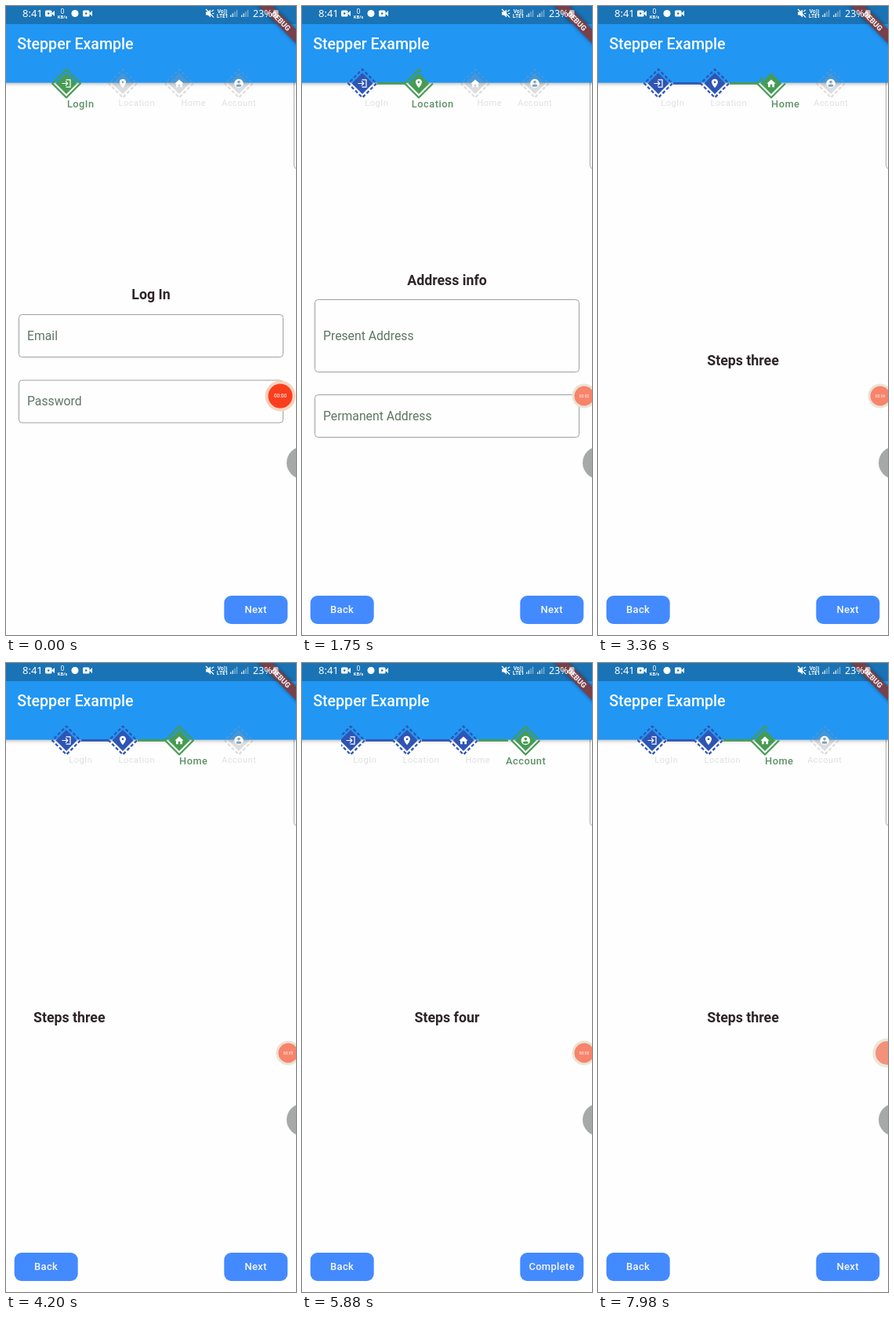
These frames come from a looping animation (370 by 800 pixels, 8 s). An HTML page with a canvas:

```html
<!DOCTYPE html>
<html lang="en">
<head>
<meta charset="utf-8">
<title>Stepper Example</title>
<style>
html, body { margin: 0; width: 100%; height: 100%; overflow: hidden; background: #fff; }
canvas { display: block; width: 370px; height: 800px; }
</style>
</head>
<body>
<canvas id="stage"></canvas>
<script>
const W = 370, H = 800, LOOP = 8000, SLIDE = 800, BORDER = 1600;
const canvas = document.getElementById('stage');
const ratio = window.devicePixelRatio || 1;
canvas.width = W * ratio;
canvas.height = H * ratio;
const c = canvas.getContext('2d');
c.scale(ratio, ratio);

const GREEN = '#469c53', BLUE = '#2e55b4', PENDING = 'rgba(150,152,155,.32)';
const ROBOTO = 'Roboto, sans-serif';

// Page changes: start time and direction
const slides = [[80, 1], [1988, 1], [3916, 1], [6313, -1]];
const steps = [
  { name: 'LogIn', x: 77, label: 95 },
  { name: 'Location', x: 149, label: 166.5 },
  { name: 'Home', x: 221, label: 239 },
  { name: 'Account', x: 297, label: 297 }
];

const clamp = v => Math.max(0, Math.min(1, v));
const ease = v => (1 - Math.cos(Math.PI * clamp(v))) / 2;
const pagePos = t => slides.reduce((p, [s, d]) => p + d * ease((t - s) / SLIDE), 0);

function activeAt(t) {
  let step = 0, since = -1e5;
  for (const [s, d] of slides) {
    if (t >= s + SLIDE / 2) { step += d; since = s + SLIDE / 2; }
  }
  return { step, since };
}

function scrollAt(t) {
  if (t < 6713) return 15 * ease((t - 4316) / 600);
  return 12 - 4 * clamp((t - 6860) / 1100);
}

function text(s, x, y, font, color, align = 'left', spacing = 0) {
  c.font = font;
  c.fillStyle = color;
  c.letterSpacing = spacing + 'px';
  c.textAlign = 'left';
  const w = c.measureText(s).width - spacing;
  c.fillText(s, align === 'center' ? x - w / 2 : x, y);
  c.letterSpacing = '0px';
}

function rect(x, y, w, h, color) {
  c.fillStyle = color;
  c.fillRect(x, y, w, h);
}

function rounded(x, y, w, h, r, fill, stroke) {
  c.beginPath();
  c.roundRect(x, y, w, h, r);
  if (fill) { c.fillStyle = fill; c.fill(); }
  if (stroke) { c.strokeStyle = stroke; c.lineWidth = 1; c.stroke(); }
}

function disc(x, y, r, color) {
  c.beginPath();
  c.arc(x, y, r, 0, Math.PI * 2);
  c.fillStyle = color;
  c.fill();
}

function poly(points, color) {
  c.beginPath();
  points.forEach(([x, y]) => c.lineTo(x, y));
  c.closePath();
  c.fillStyle = color;
  c.fill();
}

function heading(s, y) {
  text(s, 185, y, 'bold 17.75px ' + ROBOTO, '#2e2429', 'center');
}

function field(s, y, h, base) {
  rounded(16.5, y + .5, 337, h, 4, null, '#9da19f');
  text(s, 27, base, '15.75px ' + ROBOTO, '#5f7562');
}

const pages = [
  () => {
    heading('Log In', 373.2);
    field('Email', 392, 54, 424.5);
    field('Password', 475.5, 54, 508);
  },
  () => {
    heading('Address info', 354.5);
    field('Present Address', 373, 92, 424.5);
    field('Permanent Address', 494, 54, 527);
  },
  () => heading('Steps three', 457),
  () => heading('Steps four', 457)
];

function drawPages(t) {
  const pos = pagePos(t);
  pages.forEach((page, i) => {
    const dx = (i - pos) * W;
    if (Math.abs(dx) >= W) return;
    c.save();
    c.translate(dx, 0);
    page();
    c.restore();
  });
}

const icons = [
  () => {
    c.strokeStyle = '#fff';
    c.lineWidth = 1.2;
    c.beginPath();
    c.moveTo(-.5, -4.7); c.lineTo(5, -4.7); c.lineTo(5, 4.7); c.lineTo(-.5, 4.7);
    c.moveTo(-5.5, 0); c.lineTo(1.5, 0);
    c.moveTo(-1, -2.8); c.lineTo(1.8, 0); c.lineTo(-1, 2.8);
    c.stroke();
  },
  color => {
    c.beginPath();
    c.arc(0, -1.7, 4, Math.PI * .9, Math.PI * 2.1);
    c.quadraticCurveTo(3, 2.3, 0, 5.8);
    c.quadraticCurveTo(-3, 2.3, -3.8, -.5);
    c.fillStyle = '#fff';
    c.fill();
    disc(0, -1.7, 1.4, color);
  },
  () => poly([[0, -5], [5.7, .2], [4, .2], [4, 4.8], [1.3, 4.8], [1.3, 1.3],
    [-1.3, 1.3], [-1.3, 4.8], [-4, 4.8], [-4, .2], [-5.7, .2]], '#fff'),
  color => {
    disc(0, 0, 5.7, '#fff');
    disc(0, -1.9, 1.8, color);
    c.beginPath();
    c.ellipse(0, 2.7, 3.4, 1.6, 0, 0, Math.PI * 2);
    c.fill();
  }
];

function diamondPath(r) {
  c.beginPath();
  c.moveTo(r, 0); c.lineTo(0, r); c.lineTo(-r, 0); c.lineTo(0, -r);
  c.closePath();
}

function drawStep(i, x, state, progress) {
  const color = [BLUE, GREEN, PENDING][state];
  c.save();
  c.translate(x, 98.5);
  diamondPath(13.5);
  c.lineJoin = 'round';
  c.fillStyle = color;
  c.fill();
  diamondPath(18);
  c.strokeStyle = color;
  c.lineWidth = 2.2;
  const around = 18 * Math.SQRT2 * 4;
  if (state !== 1) c.setLineDash([around / 24, around / 40]);
  else if (progress < 1) c.setLineDash([around * progress, around]);
  c.stroke();
  c.setLineDash([]);
  icons[i](state === 2 ? '#7fa3c0' : color);
  c.restore();
}

function drawStepper(t) {
  const { step, since } = activeAt(t);
  const lineStep = Math.max(step, activeAt(t - 300).step);
  const progress = clamp((t - since) / BORDER);
  c.save();
  c.beginPath();
  c.rect(50, 70, 270, 70);
  c.clip();
  c.translate(-scrollAt(t), 0);
  for (let i = 0; i < lineStep; i++) {
    const x = steps[i].x + 19;
    rect(x, 97, i === 2 ? 38 : 35, 2.8, i === lineStep - 1 ? GREEN : BLUE);
  }
  steps.forEach((s, i) => {
    const on = i === step;
    const shift = on && i === 3 ? 3.3 : 0;
    drawStep(i, s.x + shift, i < step ? 0 : on ? 1 : 2, progress);
    text(s.name, s.label + shift, on ? 129 : 127.3,
      (on ? '500 12.8px ' : '11px ') + ROBOTO, on ? '#5f8f67' : '#dfe0e1', 'center', .5);
  });
  c.restore();
}

function button(s, x) {
  rounded(x, 750, 81, 36, 9, '#448aff');
  text(s, x + 40.2, 772.3, '500 13px ' + ROBOTO, '#f4f8ff', 'center', .3);
}

function camera(x) {
  rounded(x, 5.5, 8.5, 8, 1.5, '#fff');
  poly([[x + 8, 9.5], [x + 12, 6], [x + 12, 13]], '#fff');
  disc(x + 4.2, 9.5, 1.3, '#1a73b4');
}

function bars(x) {
  for (let i = 0; i < 4; i++) {
    const h = 2.5 + i * 2.2;
    rect(x + i * 2.6, 14 - h, 1.5, h, i < 2 ? '#cfe3f2' : '#76abd3');
  }
}

function drawBanner() {
  c.save();
  c.translate(350.8, 19.2);
  c.rotate(Math.PI / 4);
  c.shadowColor = 'rgba(0,0,0,.45)';
  c.shadowBlur = 5 * ratio;
  rect(-45, -6.2, 90, 12.4, '#77404a');
  c.shadowBlur = 0;
  text('DEBUG', 0, 3.4, '900 9.6px ' + ROBOTO, '#eee6e6', 'center');
  c.restore();
}

function drawStatus() {
  const noto = 'px "Noto Sans", sans-serif';
  text('8:41', 21, 14, '13' + noto, '#fff');
  camera(50);
  text('0', 72, 9.5, '8.5' + noto, '#fff', 'center');
  text('KB/s', 72, 16, 'bold 5.5' + noto, '#fff', 'center');
  disc(88, 9.5, 4.5, '#fff');
  camera(98);
  poly([[255, 7.5], [257.5, 7.5], [261, 4.5], [261, 14.5], [257.5, 11.5], [255, 11.5]], '#fff');
  c.strokeStyle = '#fff';
  c.lineWidth = 1.2;
  c.beginPath();
  c.moveTo(255, 4); c.lineTo(265, 14.5);
  c.moveTo(262, 7); c.lineTo(265, 5); c.moveTo(263, 9.5); c.lineTo(265.5, 9.5);
  c.stroke();
  text('Vo))', 276, 8.5, 'bold 6.5' + noto, '#fff', 'center');
  text('LTE1', 276, 15, 'bold 6.5' + noto, '#fff', 'center');
  bars(286);
  bars(300);
  text('23%', 315, 14, '12.5' + noto, '#fff');
  rounded(341, 5, 6.5, 10, 1.5, 'rgba(255,255,255,.6)');
}

function drawBar() {
  c.save();
  c.shadowColor = 'rgba(0,0,0,.35)';
  c.shadowBlur = 5 * ratio;
  c.shadowOffsetY = 1.5 * ratio;
  rect(-10, 0, W + 20, 97.6, '#2196f3');
  c.restore();
  rect(0, 0, W, 23, '#1a73b4');
  text('Stepper Example', 14.2, 55, '500 19.6px ' + ROBOTO, '#fff');
}

function drawRecorder(t) {
  const stopped = t >= 6700;
  const k = ease((t - 900) / 300);
  if (stopped) {
    disc(369, 496, 18.7, '#ebe8d9');
    disc(369, 496, 15, '#f4917a');
    if (Math.floor((t - 6700) / 700) % 2 === 0) disc(364.5, 496, 3.6, '#d9624f');
    return;
  }
  const x = 350 + 10 * k;
  disc(x, 496, 19.5 - 4 * k, k < .5 ? '#f6d3bd' : '#e9e3d4');
  disc(x, 496, 15.5 - 3 * k, k < .5 ? '#fa3e1d' : '#f7846b');
  const sec = Math.floor((t + 820) / 1000);
  text('00:0' + sec, x, 498.3, '500 ' + (6.5 - 1.5 * k) + 'px ' + ROBOTO,
    k < .5 ? '#ffe3dc' : '#fbe3dc', 'center');
}

function drawEdges() {
  rounded(367.5, 90, 20, 117, 4, '#fff', '#a9acac');
  disc(378.5, 581, 20.5, '#a6a9a8');
}

function draw(t) {
  rect(0, 0, W, H, '#fefefe');
  drawPages(t);
  drawEdges();
  drawBar();
  drawStepper(t);
  const { step } = activeAt(t);
  if (step > 0) button('Back', 10.7);
  button(step === 3 ? 'Complete' : 'Next', 278.3);
  drawBanner();
  drawStatus();
  drawRecorder(t);
}

const start = performance.now();
function tick() {
  draw((performance.now() - start) % LOOP);
  requestAnimationFrame(tick);
}
tick();
</script>
</body>
</html>
```
